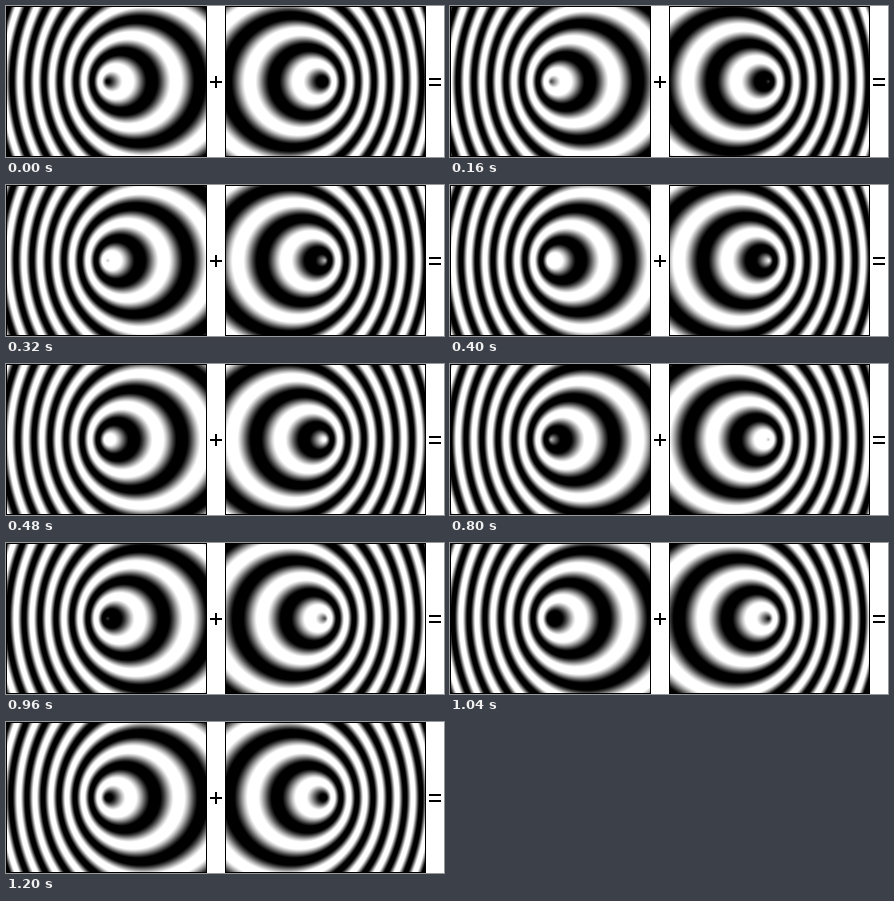
A matplotlib script for the animation above (1280 ms loop, 438 px wide and 151 px high).

```python
import numpy as np
import matplotlib.pyplot as plt
from matplotlib.animation import FuncAnimation
from matplotlib.patches import Rectangle

W, H, DPI = 438, 151, 64
FRAMES, INTERVAL = 16, 80
PANEL_W = 201
WAVELENGTH = 32
BETA = 0.5          # source speed / wave speed
GAIN = 1.3          # clips the crests to solid black and white
CREST = np.radians(157.5)   # cycle angle at which both sources are brightest

fig = plt.figure(figsize=(W / DPI, H / DPI), dpi=DPI, facecolor="white")
ax = fig.add_axes([0, 0, 1, 1])
ax.axis("off")


def bar(x, y, w, h):
    ax.add_patch(Rectangle((x, y), w, h, color="black", lw=0, antialiased=False))


def travel_distance(source_x, left, heading):
    """Distance covered by the wave between a moving source and each pixel."""
    x = np.arange(left + 1, left + PANEL_W - 1) - source_x
    y = np.arange(1, H - 1)[:, None] - 75
    dx = heading * x
    shrink = 1 - BETA ** 2
    return (BETA * dx + np.sqrt(dx ** 2 + shrink * y ** 2)) / shrink


class WavePanel:
    def __init__(self, left, source_x, heading, direction):
        self.phase = 2 * np.pi * travel_distance(source_x, left, heading) / WAVELENGTH
        self.direction = direction
        bar(left, 0, PANEL_W, H)
        self.image = ax.imshow(
            self.shade(0), cmap="gray", vmin=0, vmax=1, interpolation="nearest",
            extent=(left + 1, left + PANEL_W - 1, H - 1, 1), aspect="auto", zorder=2)

    def shade(self, angle):
        wave = np.cos(self.phase - self.direction * (angle - CREST))
        return np.clip(0.5 + 0.5 * GAIN * wave, 0, 1)

    def update(self, angle):
        self.image.set_data(self.shade(angle))


# Converging waves on the left, diverging waves on the right.
panels = [
    WavePanel(0, 100.5, heading=-1, direction=-1),
    WavePanel(219, 318.5, heading=1, direction=1),
]

# plus sign
bar(204, 75, 12, 2)
bar(209, 70, 2, 12)
# equals sign
bar(423, 72, 12, 2)
bar(423, 78, 12, 2)

ax.set_xlim(0, W)
ax.set_ylim(H, 0)


def update(frame):
    angle = 2 * np.pi * frame / FRAMES
    for panel in panels:
        panel.update(angle)
    return [panel.image for panel in panels]


anim = FuncAnimation(fig, update, frames=FRAMES, interval=INTERVAL,
                     repeat=True, repeat_delay=0, blit=False)
plt.show()
```
